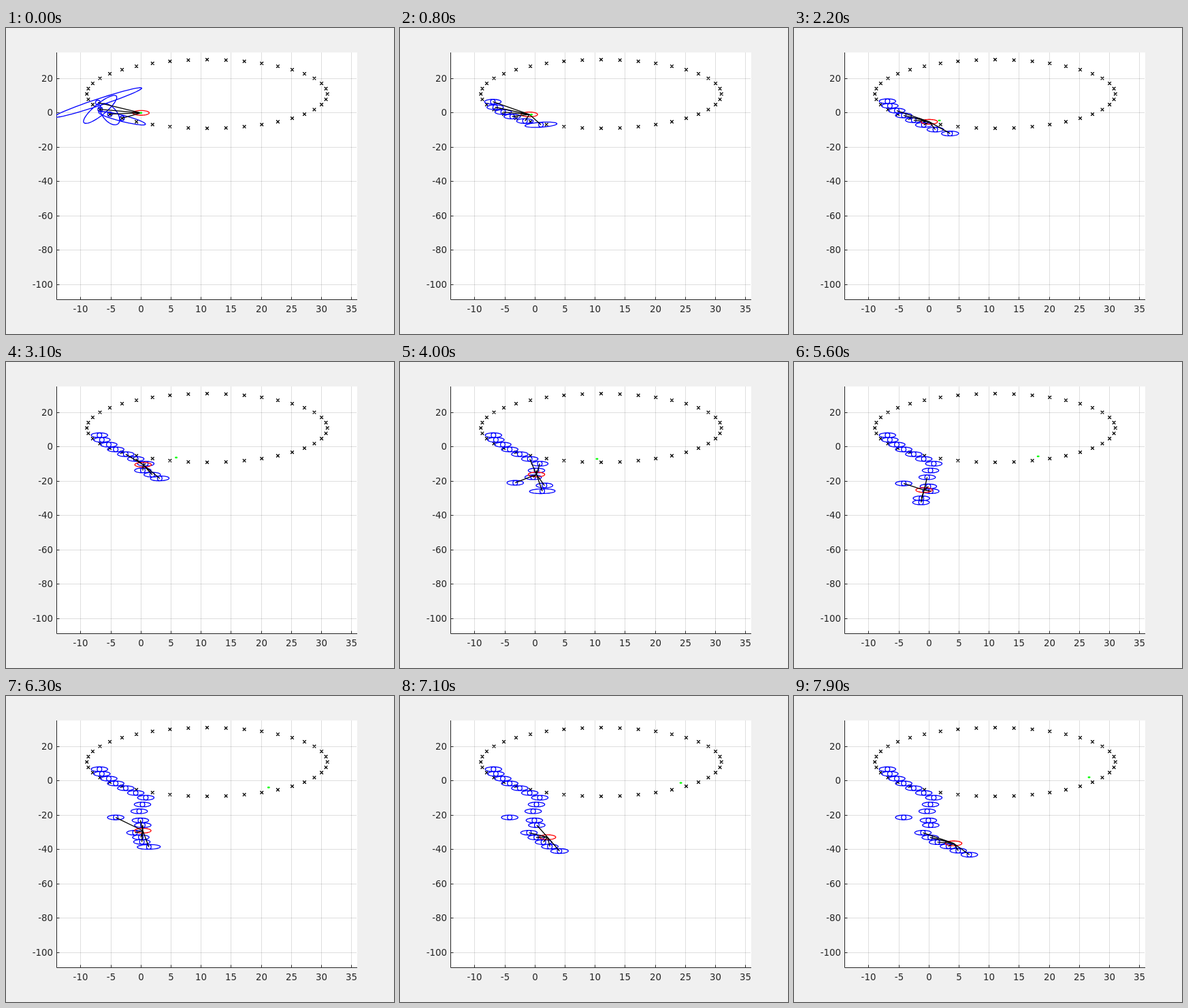
Recreate the animation shown at these times as an HTML page. Size 570x450 px, loop 8 s.

```html
<!DOCTYPE html>
<html lang="en">
<head>
<meta charset="utf-8">
<title>Landmark mapping</title>
<style>
html, body { margin: 0; width: 100%; height: 100%; overflow: hidden; background: #f0f0f0; }
svg { display: block; width: 570px; height: 450px; }
text { font: 13.33px "DejaVu Sans", sans-serif; fill: #262626; }
path, ellipse { fill: none; stroke-width: 1.33; }
</style>
</head>
<body>
<svg viewBox="0 0 570 450">
  <clipPath id="plot"><rect x="74" y="36" width="442" height="364"/></clipPath>
  <rect width="570" height="450" fill="#f0f0f0"/>
  <rect x="74.5" y="36" width="441.5" height="363.5" fill="#fff"/>
  <path id="grid" stroke="#262626" stroke-opacity=".15" style="stroke-width:1"/>
  <path id="axes" stroke="#262626" style="stroke-width:1"/>
  <g id="labels"></g>
  <g clip-path="url(#plot)">
    <path id="beacons" stroke="#000"/>
    <path id="map" stroke="#00f"/>
    <path id="robot" stroke="#f00"/>
    <path id="rays" stroke="#000"/>
    <ellipse id="truth" rx="1.4" ry=".6" stroke="#0f0"/>
  </g>
</svg>
<script>
const LOOP = 8000, STEP = 100;
const LANDMARKS = 18, SPACING = .5625, SIGHT = 3.55, SETTLE = 1.4;
const RADIUS = 1.37;

// Keys are [seconds, x, y] and [landmark, x, y] in plot units.
const route = [[0, 0, 0], [.8, -.94, -.9], [2.2, .05, -5.2], [4, .25, -16.1],
  [4.9, -1.3, -21.1], [6.3, .3, -29], [7.9, 4.1, -36.4]];
const trail = [[0, -6.9, 6.8], [1, -6.5, 4.1], [3, -4.2, -1.5], [6, .8, -9.8], [8, -.3, -17.7],
  [9, -4.2, -21.3], [10, -.1, -23], [11, .3, -25.8], [12, -1, -30.2], [14, 1.4, -35.7], [17, 6.9, -43]];

const $ = id => document.getElementById(id);
const px = x => 198.3 + 8.836 * x;
const py = y => 124.8 - 2.525 * y;
const rad = deg => deg * Math.PI / 180;
const mix = (a, b, k) => a + (b - a) * k;
const ease = k => { k = Math.min(1, Math.max(0, k)); return k * k * (3 - 2 * k); };
const point = (x, y) => px(x).toFixed(2) + " " + py(y).toFixed(2);
const onCircle = (r, deg) => [11 + r * Math.cos(rad(deg)), 11 + r * Math.sin(rad(deg))];
const beacon = i => onCircle(20, 198 + 9 * i);

function span(keys, t) {
  let i = 0;
  while (i < keys.length - 2 && t >= keys[i + 1][0]) i++;
  const dt = keys[i + 1][0] - keys[i][0];
  return [i, (t - keys[i][0]) / dt, dt];
}

function linear(keys, t) {
  const [i, k] = span(keys, t);
  return [1, 2].map(c => mix(keys[i][c], keys[i + 1][c], k));
}

function smooth(keys, t) {
  const [i, k, dt] = span(keys, t);
  const slope = (j, c) => {
    const a = keys[Math.max(0, j - 1)], b = keys[Math.min(keys.length - 1, j + 1)];
    return (b[c] - a[c]) / (b[0] - a[0]) * dt;
  };
  return [1, 2].map(c => mix(keys[i][c], keys[i + 1][c], ease(k))
    + slope(i, c) * k * (1 - k) ** 2 - slope(i + 1, c) * k * k * (1 - k));
}

// The true vehicle swings onto a circle and then follows it.
function truePosition(t) {
  if (t >= 2.2) return onCircle(18, 16 * t - 156.2);
  const k = t / 2.2, m = 1 - k;
  const curve = (a, b, c) => 3 * m * m * k * a + 3 * m * k * k * b + k ** 3 * c;
  return [curve(-.73, -1.4, 1.73), curve(-.29, -2.53, -4.43)];
}

// A first sighting is the true offset turned by the growing heading error.
// Its uncertainty lies across the line of sight and shrinks for later sightings.
function makeLandmark(_, i) {
  const due = SPACING * i - 2.19;
  const born = Math.max(0, Math.ceil(due * 10) / 10);
  const [bx, by] = beacon(i), [tx, ty] = truePosition(born), [rx, ry] = smooth(route, born);
  const range = Math.hypot(bx - tx, by - ty);
  const turn = -121 * ease(born / 6.3) - 9 * Math.cos(Math.PI * i / 6) ** 16;
  const bearing = Math.atan2(by - ty, bx - tx) + rad(turn);
  return {
    born, bearing,
    lost: due + SIGHT,
    first: [rx + range * Math.cos(bearing), ry + range * Math.sin(bearing)],
    settled: linear(trail, i),
    width: range * (.2 + Math.exp(-born))
  };
}
const landmarks = Array.from({ length: LANDMARKS }, makeLandmark);

function oval(x, y, along, across, angle) {
  const c = Math.cos(angle), s = Math.sin(angle);
  let d = "";
  for (let i = 0; i < 48; i++) {
    const u = along * Math.cos(i * Math.PI / 24), v = across * Math.sin(i * Math.PI / 24);
    d += (i ? "L" : "M") + point(x + u * c - v * s, y + u * s + v * c);
  }
  return d + "Z";
}

function drawStatic() {
  let grid = "", axes = "M74.5 36V399.5H516", labels = "", marks = "";
  const label = (x, y, anchor, value) =>
    `<text x="${x}" y="${y}" text-anchor="${anchor}">${value}</text>`;
  for (let v = -10; v <= 35; v += 5) {
    const x = Math.floor(px(v)) + .5;
    grid += `M${x} 36V399`;
    axes += `M${x} 399.5v-4`;
    labels += label(x, 418, "middle", v);
  }
  for (let v = -100; v <= 20; v += 20) {
    const y = Math.floor(py(v)) + .5;
    grid += `M75 ${y}H515`;
    axes += `M74.5 ${y}h4`;
    labels += label(69, y + 4.5, "end", v);
  }
  for (let i = 0; i < 40; i++) {
    marks += `M${point(...beacon(i))}m-2.3 -2.3l4.6 4.6m0 -4.6l-4.6 4.6`;
  }
  $("grid").setAttribute("d", grid);
  $("axes").setAttribute("d", axes);
  $("labels").innerHTML = labels;
  $("beacons").setAttribute("d", marks);
}

function draw(t) {
  const robot = smooth(route, t), truth = truePosition(t);
  let map = "", rays = "";
  for (const { born, lost, first, settled, bearing, width } of landmarks) {
    const age = t - born;
    if (age < -.001) continue;
    const k = ease(age / SETTLE);
    const [x, y] = [0, 1].map(c => mix(first[c], settled[c], k));
    const across = mix(RADIUS, width, Math.exp(-age / .12));
    map += oval(x, y, RADIUS, across, bearing);
    map += `M${point(x, y)}m-3.4 0a3.4 3.4 0 1 0 6.8 0a3.4 3.4 0 1 0 -6.8 0`;
    if (t < lost) rays += `M${point(...robot)}L${point(x, y)}`;
  }
  $("map").setAttribute("d", map);
  $("rays").setAttribute("d", rays);
  $("robot").setAttribute("d", oval(...robot, RADIUS, RADIUS, 0));
  $("truth").setAttribute("cx", px(truth[0]));
  $("truth").setAttribute("cy", py(truth[1]));
}

const start = performance.now();
function tick() {
  const ms = (performance.now() - start) % LOOP;
  draw(Math.floor(ms / STEP) * STEP / 1000);
  requestAnimationFrame(tick);
}
drawStatic();
tick();
</script>
</body>
</html>
```
